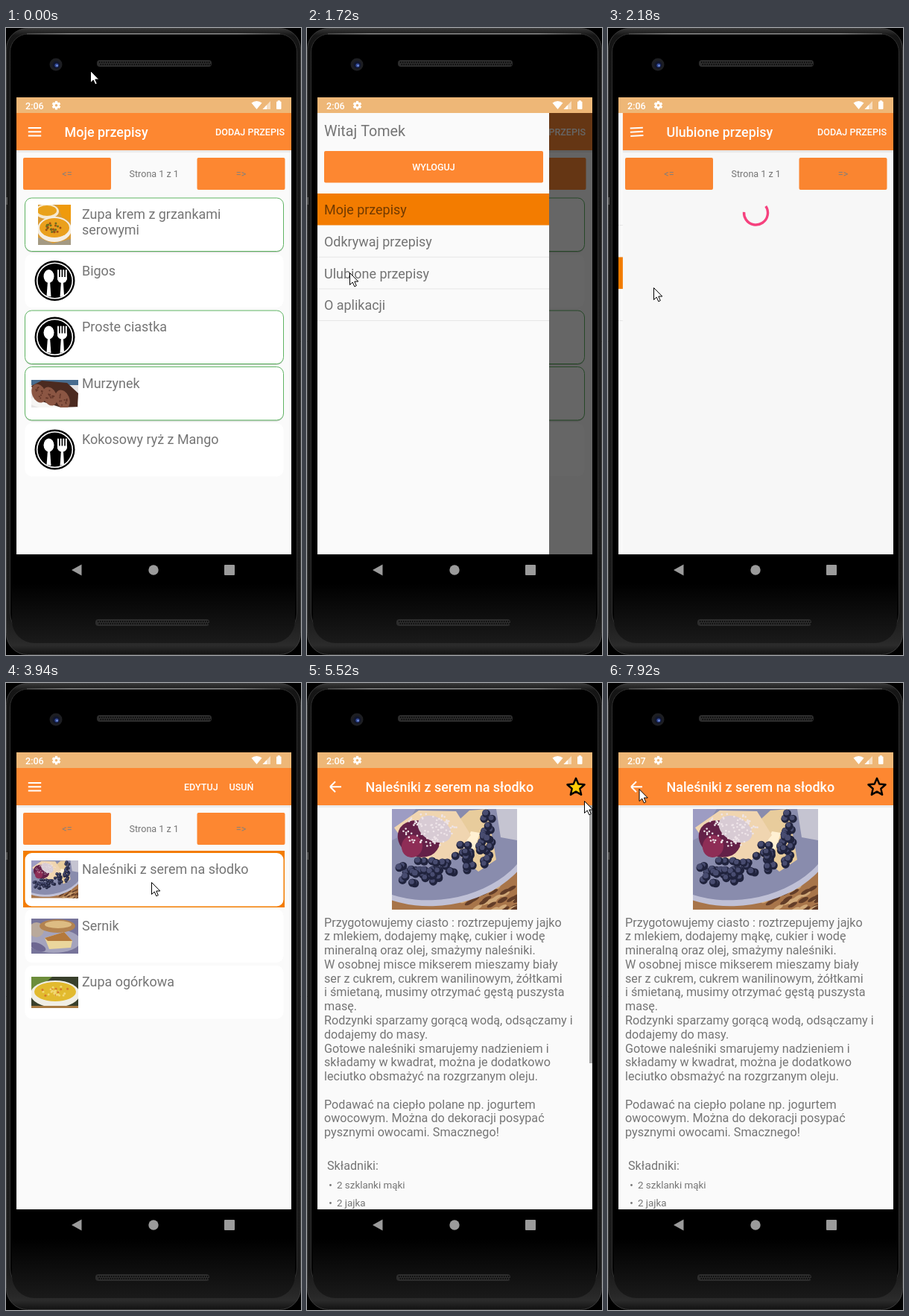
Recreate the animation shown at these times as an HTML page with a canvas. Size 396 px wide and 841 px high, loop 8000 ms.

```html
<!DOCTYPE html>
<html lang="pl">
<head>
<meta charset="utf-8">
<title>Przepisy</title>
<style>
html, body { margin: 0; width: 100%; height: 100%; overflow: hidden; background: #000; }
canvas { display: block; width: 396px; height: 841px; }
</style>
</head>
<body>
<canvas id="stage"></canvas>
<script>
const W = 396, H = 841, LOOP = 8000;
const canvas = document.getElementById('stage');
const c = canvas.getContext('2d');
const dpr = window.devicePixelRatio || 1;
canvas.width = W * dpr;
canvas.height = H * dpr;

const ORANGE = '#fd8731', ACTIVE = '#f37c00', GREY = '#757575', PAPER = '#fafafa';
const SCREEN = { x: 14, y: 93, w: 369, h: 613 };

// ---- helpers ----
const clamp = v => Math.max(0, Math.min(1, v));
const progress = (t, from, to) => clamp((t - from) / (to - from));
const smooth = u => u * u * (3 - 2 * u);
const mix = (a, b, u) => a + (b - a) * u;

function rect(x, y, w, h, fill) { c.fillStyle = fill; c.fillRect(x, y, w, h); }

function round(x, y, w, h, r, fill, stroke, line = 1) {
  c.beginPath();
  c.roundRect(x, y, w, h, r);
  if (fill) { c.fillStyle = fill; c.fill(); }
  if (stroke) { c.strokeStyle = stroke; c.lineWidth = line; c.stroke(); }
}

function oval(x, y, rx, ry, fill, turn = 0) {
  c.beginPath();
  c.ellipse(x, y, rx, ry, turn, 0, 7);
  c.fillStyle = fill;
  c.fill();
}
const disc = (x, y, r, fill) => oval(x, y, r, r, fill);

function poly(points, fill) {
  c.beginPath();
  points.forEach(([x, y]) => c.lineTo(x, y));
  c.closePath();
  c.fillStyle = fill;
  c.fill();
}

function text(str, x, y, size, fill = GREY, weight = 400, align = 'left') {
  c.font = `${weight} ${size}px Roboto, sans-serif`;
  c.textAlign = align;
  c.fillStyle = fill;
  c.fillText(str, x, y);
}

function clipped(x, y, w, h, draw) {
  c.save();
  c.beginPath();
  c.rect(x, y, w, h);
  c.clip();
  draw();
  c.restore();
}

// Draws in a local w by h box, scaled to the given width.
function picture(x, y, width, w, h, draw) {
  c.save();
  c.translate(x, y);
  c.scale(width / w, width / w);
  clipped(0, 0, w, h, draw);
  c.restore();
}

function random(seed) {
  return () => (seed = (seed * 16807) % 2147483647) / 2147483647;
}

function scatter(seed, count, cx, cy, rx, ry, draw) {
  const rnd = random(seed);
  for (let i = 0; i < count; i++) {
    const a = rnd() * 6.283, r = Math.sqrt(rnd());
    draw(cx + Math.cos(a) * r * rx, cy + Math.sin(a) * r * ry, rnd());
  }
}

// ---- dishes ----
const berry = (x, y, k) => {
  disc(x, y, 5.5, '#20233d');
  disc(x - 1, y - 1.5, 3 + k, '#484c70');
};

const pancakes = (x, y, width) => picture(x, y, width, 168, 135, () => {
  rect(0, 0, 168, 135, '#a8754a');
  scatter(77, 50, 130, 122, 50, 20, (px, py, k) => oval(px, py, 7, 2.5, k > .5 ? '#d0a878' : '#633d28', -.5));
  oval(66, 45, 125, 84, '#bfc0d6', -.16);
  oval(65, 41, 122, 80, '#898cad', -.16);
  poly([[140, 0], [168, 0], [168, 42], [146, 38]], '#c5c4d1');
  poly([[0, 0], [32, 0], [8, 38], [0, 42]], '#9d9cc3');
  poly([[82, 22], [104, 2], [128, 0], [140, 68], [116, 84], [86, 58]], '#e8cc9c');
  poly([[106, 30], [118, 32], [108, 62], [92, 60]], '#fff0d2');
  poly([[3, 25], [36, 2], [86, 3], [106, 35], [76, 72], [30, 64]], '#f0d5b0');
  oval(36, 40, 29, 24, '#642148', .4);
  oval(27, 50, 14, 15, '#8e2d56', .3);
  oval(57, 27, 24, 16, '#d8cbd4', .5);
  scatter(31, 90, 52, 28, 37, 23, (px, py) => disc(px, py, 1.3, '#eee4e8'));
  scatter(12, 35, 48, 85, 46, 16, berry);
  scatter(53, 26, 108, 62, 23, 22, berry);
  scatter(9, 14, 129, 28, 8, 26, berry);
});

const pumpkinSoup = (x, y) => picture(x, y, 44, 44, 54, () => {
  rect(0, 0, 44, 54, '#d99b35');
  poly([[26, 0], [44, 0], [44, 22], [32, 16]], '#ef9a0c');
  oval(12, 9, 16, 10, '#f7ead0');
  oval(12, 8, 13, 7, '#e9a21b');
  oval(22, 33, 23, 17, '#f5eee2');
  oval(22, 31, 20, 13, '#eaa01d');
  scatter(5, 22, 21, 31, 11, 7, (px, py, k) => disc(px, py, 1.5, k > .5 ? '#a34d12' : '#6b7020'));
  poly([[0, 44], [20, 52], [44, 46], [44, 54], [0, 54]], '#a49a83');
});

const loaf = (x, y) => picture(x, y, 63, 63, 37, () => {
  rect(0, 0, 63, 37, '#e6e4e4');
  rect(0, 0, 63, 7, '#486c8f');
  oval(31, 29, 34, 10, '#f6f5f3');
  poly([[0, 8], [14, 1], [48, 4], [63, 18], [62, 36], [40, 37], [8, 27]], '#4b2a20');
  [10, 25, 42].forEach((px, i) => {
    oval(px, 18 + i * 4, 9, 13, '#8b5643', -.4);
    scatter(20 + i, 12, px, 18 + i * 4, 6, 9, (a, b) => disc(a, b, 1, '#613427'));
  });
});

const cheesecake = (x, y) => picture(x, y, 63, 63, 47, () => {
  rect(0, 0, 63, 47, '#77749a');
  oval(30, 30, 36, 16, '#a4a3bd');
  disc(7, 15, 10, '#b9a99b');
  oval(35, 10, 24, 9, '#b38350');
  oval(36, 8, 18, 5, '#ddbc83');
  poly([[18, 26], [44, 18], [55, 30], [53, 39], [24, 41]], '#ead69c');
  poly([[18, 26], [44, 18], [55, 30], [22, 30]], '#b4793c');
  oval(9, 38, 11, 5, '#6d6791', .4);
});

const cucumberSoup = (x, y) => picture(x, y, 63, 63, 42, () => {
  rect(0, 0, 63, 42, '#39402b');
  poly([[0, 0], [28, 0], [12, 14], [0, 18]], '#6c8d3b');
  oval(32, 23, 33, 18, '#f0eee5');
  oval(32, 20, 28, 13, '#e2ba2e');
  scatter(8, 26, 32, 20, 19, 8, (px, py, k) => disc(px, py, 1.5, k > .6 ? '#d5792b' : '#f1d873'));
  rect(0, 39, 63, 3, '#a87b43');
});

// Cutlery badge used when a recipe has no picture.
function cutlery(x, y) {
  c.save();
  c.translate(x, y);
  disc(0, 0, 27, '#000');
  disc(0, 0, 24.6, '#fff');
  disc(0, 0, 23, '#000');
  oval(-8, -6, 7, 9, '#fff');
  poly([[-9.5, 1], [-6.5, 1], [-5, 21.5], [-11, 20.5]], '#fff');
  for (let i = 0; i < 4; i++) round(3.5 + i * 3.6, -15, 2, 14, 1, '#fff');
  round(3.5, -5, 12.8, 8, [0, 0, 6, 6], '#fff');
  poly([[8.4, 2], [11.4, 2], [12.5, 20], [7, 21.5]], '#fff');
  c.restore();
}
const badge = top => cutlery(65.5, top + 35.5);

const MINE = [
  { name: ['Zupa krem z grzankami', 'serowymi'], framed: true, pic: top => pumpkinSoup(43, top + 9) },
  { name: ['Bigos'], pic: badge },
  { name: ['Proste ciastka'], framed: true, pic: badge },
  { name: ['Murzynek'], framed: true, pic: top => loaf(34, top + 17.5) },
  { name: ['Kokosowy ryż z Mango'], pic: badge }
];
const FAVOURITES = [
  { name: ['Naleśniki z serem na słodko'], pic: top => pancakes(34, top + 10, 63) },
  { name: ['Sernik'], pic: top => cheesecake(34, top + 12.5) },
  { name: ['Zupa ogórkowa'], pic: top => cucumberSoup(34, top + 15) }
];
const RECIPE = [
  'Przygotowujemy ciasto : roztrzepujemy jajko', 'z mlekiem, dodajemy mąkę, cukier i wodę',
  'mineralną oraz olej, smażymy naleśniki.', 'W osobnej misce mikserem mieszamy biały',
  'ser z cukrem, cukrem wanilinowym, żółtkami', 'i śmietaną, musimy otrzymać gęstą puszysta',
  'masę.', 'Rodzynki sparzamy gorącą wodą, odsączamy i', 'dodajemy do masy.',
  'Gotowe naleśniki smarujemy nadzieniem i', 'składamy w kwadrat, można je dodatkowo',
  'leciutko obsmażyć na rozgrzanym oleju.', '', 'Podawać na ciepło polane np. jogurtem',
  'owocowym. Można do dekoracji posypać', 'pysznymi owocami. Smacznego!'
];
const MENU = ['Moje przepisy', 'Odkrywaj przepisy', 'Ulubione przepisy', 'O aplikacji'];

// ---- phone ----
function grille(x, y, w) {
  round(x, y, w, 9, 4, '#2c2c2c');
  for (let i = 3; i < w - 2; i += 3) {
    rect(x + i, y + 2, 1.4, 2, '#0c0c0c');
    rect(x + i + 1.5, y + 5, 1.4, 2, '#0c0c0c');
  }
}

function phone() {
  rect(0, 0, W, H, '#000');
  const body = c.createLinearGradient(0, 0, 0, H);
  [[0, '#3a3a3a'], [.012, '#151515'], [.5, '#1c1c1c'], [.94, '#1b1b1b'], [.985, '#2b2b2b'], [1, '#111']]
    .forEach(([at, color]) => body.addColorStop(at, color));
  round(.5, .5, 395, 840, 28, body, '#3c3c3c');
  round(5.5, 8, 385, 812, [24, 24, 36, 36], '#000', '#303030');
  const shade = c.createLinearGradient(0, 745, 0, 835);
  shade.addColorStop(0, '#000');
  shade.addColorStop(1, '#1d1d1d');
  round(8, 745, 380, 80, [0, 0, 30, 30], shade);
  const shine = c.createLinearGradient(10, 0, 386, 0);
  shine.addColorStop(0, '#333');
  shine.addColorStop(.2, '#8a8a8a');
  shine.addColorStop(.8, '#8a8a8a');
  shine.addColorStop(1, '#333');
  rect(28, 7, 340, 1.5, shine);
  rect(0, 227, 2, 10, '#555');

  disc(67, 49, 8.5, '#1d1e22');
  disc(67.5, 49.5, 5, '#11162c');
  disc(68, 50, 2.6, '#344b9c');
  disc(68.5, 50.5, 1, '#9db7f5');
  grille(122, 43, 154);
  grille(120, 793, 153);
  poly([[88, 727], [101.5, 719.5], [101.5, 734.5]], '#9b9b9b');
  disc(198, 727, 6.7, '#9b9b9b');
  round(293, 720, 14, 14, 1, '#9b9b9b');
}

function statusBar(t) {
  rect(14, 93, 369, 21, '#eeb777');
  text(t < 7550 ? '2:06' : '2:07', 26, 108.5, 12.57, '#fff', 500);
  c.save();
  c.translate(67.5, 103.7);
  for (let i = 0; i < 6; i++) {
    rect(-1.6, -5.8, 3.2, 3, '#fff');
    c.rotate(Math.PI / 3);
  }
  disc(0, 0, 4.4, '#fff');
  disc(0, 0, 1.8, '#eeb777');
  c.restore();
  c.beginPath();
  c.moveTo(336.5, 109);
  c.arc(336.5, 109, 11, -Math.PI * .72, -Math.PI * .28);
  c.fillStyle = '#fff';
  c.fill();
  poly([[355, 98], [355, 109], [344.5, 109]], 'rgba(255,255,255,.55)');
  poly([[350, 103.3], [350, 109], [344.5, 109]], '#fff');
  round(363, 98.5, 6.5, 10.5, 1, '#fff');
  rect(364.8, 97.2, 3, 2, '#fff');
}

// ---- app ----
// Three bars at 0, a left arrow at 1.
function navIcon(m) {
  c.save();
  c.translate(38.5, 139.3);
  c.rotate(-Math.PI * m);
  c.beginPath();
  for (const s of [-1, 1]) {
    c.moveTo(mix(-8.7, .5, m), s * mix(5.2, 7, m));
    c.lineTo(mix(8.7, 7.5, m), s * mix(5.2, 0, m));
  }
  c.moveTo(mix(-8.7, -7.5, m), 0);
  c.lineTo(mix(8.7, 7.5, m), 0);
  c.strokeStyle = '#fff';
  c.lineWidth = 2;
  c.stroke();
  c.restore();
}

function appBar(title, actions, icon) {
  rect(14, 164, 369, 3, 'rgba(0,0,0,.06)');
  rect(14, 114, 369, 50, ORANGE);
  navIcon(icon);
  text(title, 78.5, 146.3, 17.95, '#fff', 500);
  actions.forEach(([label, x]) => text(label, x, 144, 12.57, '#fff', 500));
}

function pager() {
  for (const [x, label] of [[23, '<='], [256.5, '=>']]) {
    round(x, 174, 118, 43, 2, ORANGE);
    text(label, x + 59, 200, 12.57, '#84807c', 400, 'center');
  }
  text('Strona 1 z 1', 198.7, 200.3, 12.57, GREY, 400, 'center');
}

function recipeList(items, selected) {
  items.forEach((item, i) => {
    const top = 228 + 75.5 * i;
    if (i === selected) rect(23, 225, 351, 76, ACTIVE);
    if (item.framed) round(25.5, top + 1, 347, 72, 9, '#c9cfc9');
    round(25.5, top, 347, 71.5, 9, '#fff', item.framed ? '#5fb463' : null);
    item.pic(top);
    item.name.forEach((line, n) => text(line, 102, top + 28 + 21 * n, 17.95));
  });
}

function spinner(t) {
  const start = (t - 2180) * .006 - .6;
  c.beginPath();
  c.arc(198.5, 248, 16, start, start + 3.8 + .5 * Math.sin((t - 2180) / 160));
  c.strokeStyle = '#f9427f';
  c.lineWidth = 3.4;
  c.stroke();
}

function star(filled) {
  c.beginPath();
  for (let i = 0; i < 10; i++) {
    const r = i % 2 ? 5.6 : 12.2, a = i * Math.PI / 5 - Math.PI / 2;
    c.lineTo(361 + r * Math.cos(a), 140 + r * Math.sin(a));
  }
  c.closePath();
  if (filled) { c.fillStyle = '#ffcb05'; c.fill(); }
  c.strokeStyle = '#000';
  c.lineWidth = 2.4;
  c.lineJoin = 'round';
  c.stroke();
}

function details(t) {
  appBar('Naleśniki z serem na słodko', [], smooth(progress(t, 4000, 4300)));
  const press = progress(t, 5800, 5980);
  if (press > 0 && t < 6250) disc(361, 139, 18 * press, `rgba(255,255,255,${.25 * (1 - progress(t, 5980, 6250))})`);
  star(t < 6540);
  pancakes(114, 169, 168);
  RECIPE.forEach((line, i) => text(line, 23, 326.5 + 18.78 * i, 16.16));
  text('Składniki:', 27, 653, 16.16);
  ['2 szklanki mąki', '2 jajka'].forEach((line, i) => {
    disc(31.5, 673.5 + 24 * i, 1.4, GREY);
    text(line, 40, 678 + 24 * i, 13.4);
  });
  rect(379, 164, 4, 346, `rgba(110,110,110,${.6 * (1 - progress(t, 5600, 5850))})`);
}

function drawer(open, selected) {
  rect(14, 114, 369, 592, `rgba(0,0,0,${.6 * open})`);
  c.save();
  c.translate(-311 * (1 - open), 0);
  rect(14, 114, 311, 592, PAPER);
  text('Witaj Tomek', 23, 144.7, 19.75);
  round(23, 165, 294, 42.5, 2, ORANGE);
  text('WYLOGUJ', 170, 190.8, 12.57, '#fff', 500, 'center');
  MENU.forEach((label, i) => {
    const top = 222 + 42.7 * i;
    if (i === selected) rect(14, top, 311, 42.5, ACTIVE);
    else rect(14, top + 42, 311, 1, '#e6e6e6');
    text(label, 23, top + 28.2, 17.95, 'rgba(0,0,0,.54)');
  });
  c.restore();
}

function app(t) {
  const opening = 1 - (1 - progress(t, 620, 1080)) ** 3;
  const closing = (1 - progress(t, 1820, 2312)) ** 3;
  const open = opening * closing;
  const add = [['DODAJ PRZEPIS', 281]];
  rect(14, 93, 369, 613, PAPER);
  if (t >= 4040) details(t);
  else {
    const picked = t >= 3940;
    if (picked) appBar('', [['EDYTUJ', 239], ['USUŃ', 299.5]], 0);
    else appBar(t < 1860 ? MENU[0] : MENU[2], add, open);
    pager();
    if (t < 1860) recipeList(MINE);
    else if (t < 2380) spinner(t);
    else recipeList(FAVOURITES, picked ? 0 : -1);
  }
  if (open > 0) drawer(open, t < 1810 ? 0 : 2);
  statusBar(t);
}

// ---- pointer: time, x, y ----
const PATH = [
  [0, 113, 57], [60, 113, 57], [520, 38, 137], [1050, 38, 137], [1620, 57, 328], [1780, 57, 328],
  [2180, 61, 348], [2470, 75, 380], [3300, 195, 267], [4040, 195, 267], [4500, 197, 275],
  [4690, 199, 293], [5520, 372, 158], [5700, 362, 140], [6020, 362, 140], [6440, 362, 207],
  [6900, 354, 228], [7290, 354, 228], [7900, 41.5, 142], [LOOP, 41.5, 142]
];
const CLICKS = [560, 1740, 3480, 5780];

function pointer(t) {
  const i = PATH.findIndex(p => p[0] > t);
  const [t0, x0, y0] = PATH[i - 1], [t1, x1, y1] = PATH[i];
  const u = smooth(progress(t, t0, t1));
  c.save();
  c.translate(mix(x0, x1, u), mix(y0, y1, u));
  if (CLICKS.some(k => t >= k && t < k + 100)) {
    c.beginPath();
    c.arc(0, 0, 11, 0, 7);
    c.strokeStyle = 'rgba(90,90,90,.6)';
    c.lineWidth = 1.5;
    c.stroke();
  }
  poly([[.5, .5], [.5, 16.5], [4.2, 13], [6.8, 18.8], [9.3, 17.6], [6.8, 12], [11.8, 12]], '#fff');
  c.strokeStyle = '#000';
  c.lineWidth = 1;
  c.lineJoin = 'miter';
  c.stroke();
  c.restore();
}

function frame(now) {
  const t = now % LOOP;
  c.setTransform(dpr, 0, 0, dpr, 0, 0);
  phone();
  clipped(SCREEN.x, SCREEN.y, SCREEN.w, SCREEN.h, () => app(t));
  pointer(t);
  requestAnimationFrame(() => frame(performance.now()));
}
frame(performance.now());
</script>
</body>
</html>
```
